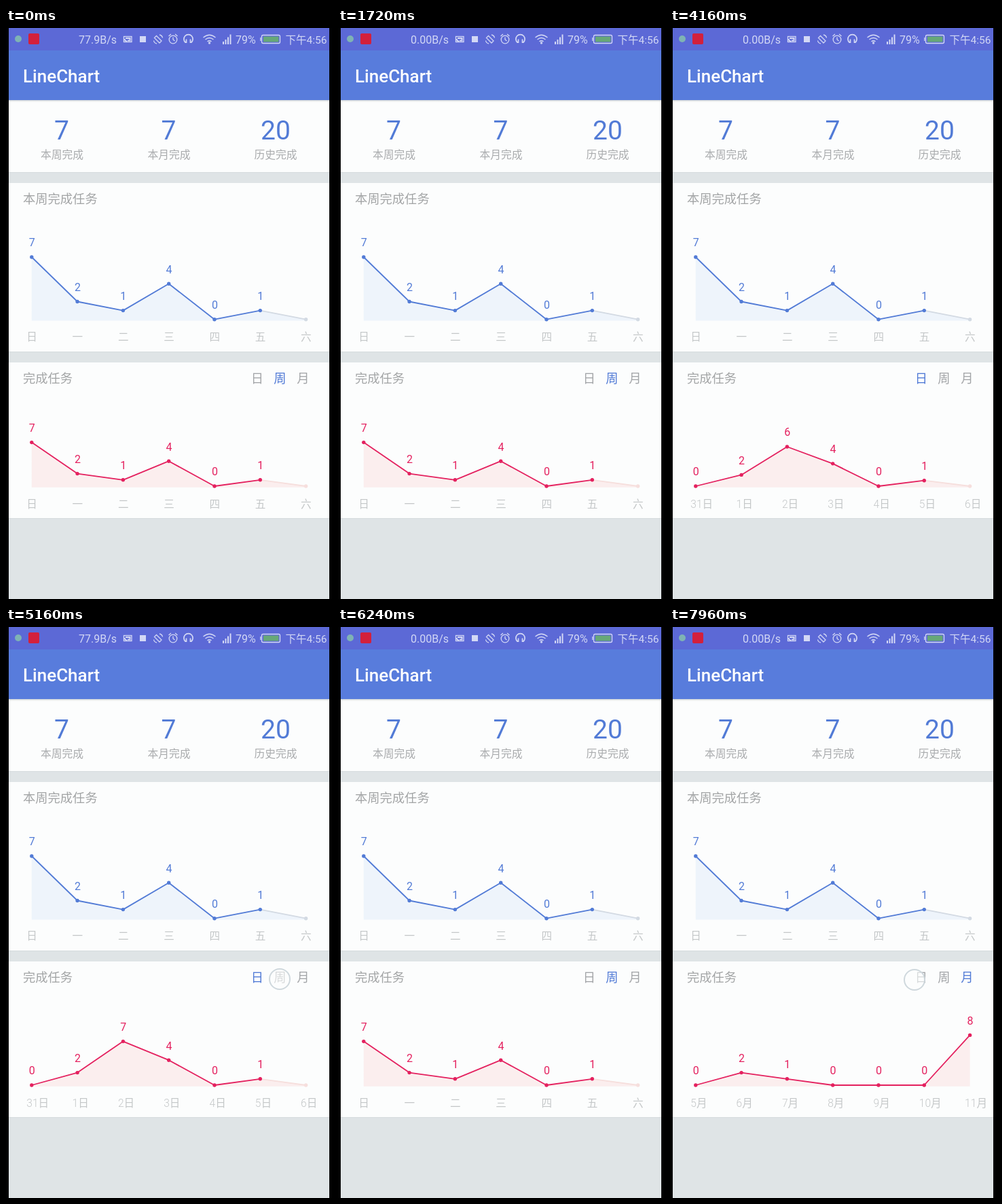
Animation, 480 px wide and 840 px high, one loop 8000 ms. Source, as an HTML page:

```html
<!DOCTYPE html>
<html lang="zh-CN">
<head>
<meta charset="utf-8">
<title>LineChart</title>
<style>
html, body { margin: 0; width: 100%; height: 100%; overflow: hidden; background: #000; }
svg { display: block; width: 100%; height: 100%; }
text { font-family: Roboto, "Noto Sans CJK SC", "Noto Sans CJK", sans-serif; }
.status { font-size: 16px; fill: #d3d8f5; }
.icons { fill: none; stroke: #d3d8f5; stroke-width: 1.3; }
.total { font-size: 39px; fill: #527bd6; text-anchor: middle; }
.caption { font-size: 15.8px; fill: #a9abad; text-anchor: middle; }
.heading { font-size: 18.3px; fill: #a3a5a6; }
.tab { font-size: 18.3px; fill: #a3a5a8; text-anchor: middle; }
.tab.on { fill: #527bd6; }
.value { font-size: 16px; text-anchor: middle; }
.axis { font-size: 15.6px; font-weight: 300; fill: #c4c7c8; }
.chart polyline { fill: none; stroke-width: 1.8; stroke-linejoin: round; }
</style>
</head>
<body>
<svg viewBox="0 0 480 840">
  <defs>
    <linearGradient id="shade" x2="0" y2="1">
      <stop stop-color="#c9ced0"/><stop offset="1" stop-color="#fcfdfd" stop-opacity="0"/>
    </linearGradient>
  </defs>
  <rect width="480" height="840" fill="#000"/>
  <rect x="4" width="472" height="840" fill="#dfe4e6"/>
  <rect x="4" width="472" height="33" fill="#5c69d6"/>
  <rect x="4" y="33" width="472" height="73" fill="#587cdc"/>
  <g fill="#fcfdfd">
    <rect x="4" y="106" width="472" height="106"/>
    <rect x="4" y="228" width="472" height="248"/>
    <rect x="4" y="492" width="472" height="229"/>
  </g>
  <rect x="4" y="106" width="472" height="4" fill="url(#shade)"/>
  <path d="M4 212.5H476M4 476.5H476M4 721.5H476" stroke="#d6dbdd"/>

  <circle cx="18" cy="16" r="5" fill="#7fb3b4"/>
  <rect x="33" y="8" width="16" height="16" rx="2" fill="#d3203c"/>
  <text class="status" id="rate" x="163" y="23" text-anchor="end"></text>
  <g class="icons">
    <rect x="173.500" y="12.500" width="11.500" height="8"/>
    <path d="M176 15H182.500V18.500H179M174 16.500L178 20.500" stroke-width="2"/>
    <rect x="197" y="12" width="9" height="9" fill="#d3d8f5" stroke="none"/>
    <path d="M221.500 11.500L229 19L226 22L218.500 14.500ZM226 10Q230 11 230.500 14.500M222 23Q218 22 217.500 18.500"/>
    <circle cx="246" cy="17" r="5.800"/>
    <path d="M246 13.500V17L248.500 19M239.500 12L243 9M252.500 12L249 9"/>
    <path d="M264.500 21.500A6.600 6.600 0 1 1 272.500 21.500M265.500 16.500V22M271.500 16.500V22" stroke-width="1.7"/>
    <path d="M290.500 14Q299.500 6.500 308.500 14M293.500 17Q299.500 12 305.500 17M296.500 20Q299.500 17.500 302.500 20"/>
    <circle cx="299.500" cy="22" r="1"/>
    <path d="M320 24V20M323.500 24V17M327 24V13.500M330.500 24V9.500" stroke-width="2"/>
    <rect x="376.500" y="10.500" width="27" height="12" rx="2"/>
    <path d="M374.800 14V19"/>
    <rect x="379" y="12.500" width="22.500" height="8" fill="#67a878" stroke="none"/>
  </g>
  <text class="status" x="338" y="23">79%</text>
  <text class="status" x="411.500" y="23" style="font-size:15.500px">下午4:56</text>

  <text x="25" y="80" font-size="26" font-weight="500" fill="#fff">LineChart</text>
  <text class="total" x="82" y="164">7</text>
  <text class="total" x="239.500" y="164">7</text>
  <text class="total" x="397" y="164">20</text>
  <text class="caption" x="82.500" y="192">本周完成</text>
  <text class="caption" x="240" y="192">本月完成</text>
  <text class="caption" x="397" y="192">历史完成</text>
  <text class="heading" x="25" y="258">本周完成任务</text>
  <text class="heading" x="25" y="522">完成任务</text>
  <text class="tab" x="370" y="522">日</text>
  <text class="tab" x="403.500" y="522">周</text>
  <text class="tab" x="437.500" y="522">月</text>
  <g class="chart" id="weekChart"></g>
  <g class="chart" id="taskChart"></g>
  <circle id="touch" r="15" fill="#fcfdfd" fill-opacity=".6" stroke="#cfd8dd" stroke-width="2"/>
</svg>
<script>
const LOOP = 8000, GROW = 1050;
const $ = id => document.getElementById(id);
const tabs = document.querySelectorAll('.tab');

const week = { tab: 1, values: [7, 2, 1, 4, 0, 1, 0], labels: [...'日一二三四五六'], pending: true };
const day = { tab: 0, values: [0, 2, 7, 4, 0, 1, 0], labels: [31, 1, 2, 3, 4, 5, 6].map(n => n + '日'), pending: true };
const month = { tab: 2, values: [0, 2, 1, 0, 0, 0, 8], labels: [5, 6, 7, 8, 9, 10, 11].map(n => n + '月') };

const blue = { base: 428.7, unit: 13.1, axisY: 459.7, line: '#527bd6', fill: '#eef4fb', faint: '#d3dae3' };
const red = { base: 674, unit: 9.2, axisY: 705.7, line: '#e4215f', fill: '#fbeeee', faint: '#f6dfdd' };

const views = [[-GROW, week], [3215, day], [5168, week], [6434, month]];
const rates = [[0, '77.9B/s'], [640, '5.03K/s'], [1600, '0.00B/s'], [4840, '77.9B/s'], [6160, '0.00B/s']];

// start, end, from x, y, to x, y
const touches = [
  [640, 1090, 404, 530, 435, 845],
  [3080, 3215, 368, 518, 368, 518],
  [5040, 5168, 403, 518, 403, 518],
  [6280, 6434, 437, 518, 437, 518],
  [7900, 8000, 360, 519, 360, 519]
];

const latest = (list, t) => list.filter(([start]) => start <= t).pop();

function drawChart(node, data, style, progress) {
  const pts = data.values.map((v, i) => [37.8 + 67.3 * i, style.base - v * progress * style.unit]);
  const solid = data.pending ? pts.slice(0, -1) : pts;
  const floor = style.base + 1.8;
  let out = `<polygon points="${pts.join(' ')} ${pts[6][0]},${floor} ${pts[0][0]},${floor}" fill="${style.fill}"/>`;
  if (data.pending) out += `<polyline points="${pts.slice(-2).join(' ')}" stroke="${style.faint}"/>`;
  out += `<polyline points="${solid.join(' ')}" stroke="${style.line}"/>`;
  pts.forEach(([x, y], i) => {
    const future = i >= solid.length;
    out += `<circle cx="${x}" cy="${y}" r="2.7" fill="${future ? style.faint : style.line}"/>`;
    if (!future) {
      out += `<text class="value" x="${x + .4}" y="${y - 15.6}" fill="${style.line}">${Math.round(data.values[i] * progress)}</text>`;
    }
    out += `<text class="axis" x="${x - 7.5}" y="${style.axisY}">${data.labels[i]}</text>`;
  });
  node.innerHTML = out;
}

function render(t) {
  const [start, view] = latest(views, t);
  drawChart($('taskChart'), view, red, Math.min(1, (t - start) / GROW));
  tabs.forEach((tab, i) => tab.classList.toggle('on', i === view.tab));
  $('rate').textContent = latest(rates, t)[1];

  const touch = touches.find(([a, b]) => t >= a && t < b);
  $('touch').setAttribute('visibility', touch ? 'visible' : 'hidden');
  if (touch) {
    const [a, b, x0, y0, x1, y1] = touch, k = (t - a) / (b - a);
    $('touch').setAttribute('cx', x0 + (x1 - x0) * k);
    $('touch').setAttribute('cy', y0 + (y1 - y0) * k);
  }
}

drawChart($('weekChart'), week, blue, 1);
const begin = performance.now();
function frame() {
  render((performance.now() - begin) % LOOP);
  requestAnimationFrame(frame);
}
frame();
</script>
</body>
</html>
```
